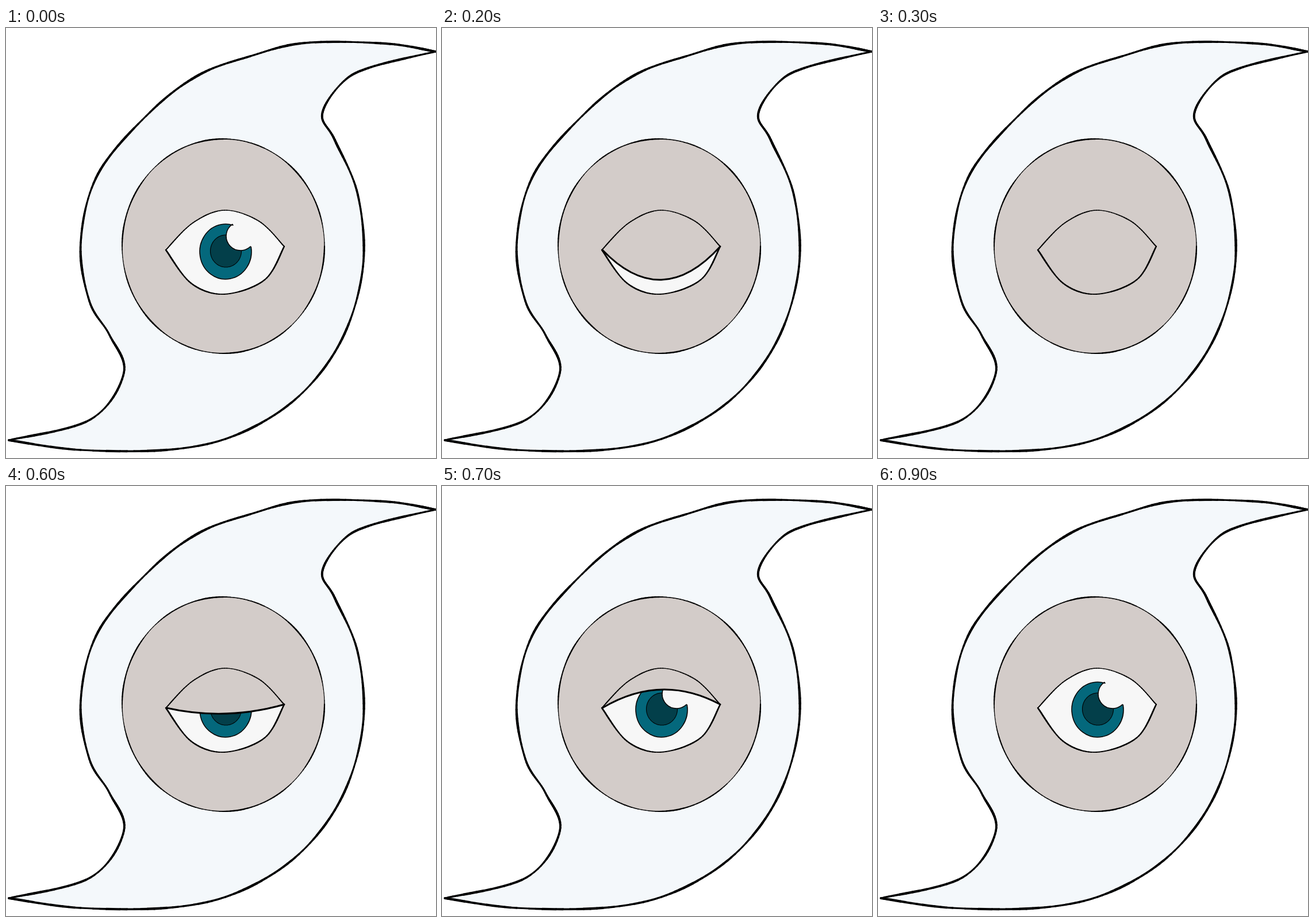
These frames come from a looping animation (748x748 px, 1000 ms). An HTML page with a canvas:

```html
<!DOCTYPE html>
<html lang="en">
<head>
<meta charset="utf-8">
<title>Blinking storm eye</title>
<style>
  html, body { margin: 0; width: 100%; height: 100%; overflow: hidden; background: #fff; }
  canvas { display: block; width: 748px; height: 748px; }
</style>
</head>
<body>
<canvas id="stage" width="748" height="748"></canvas>
<script>
const ctx = document.getElementById('stage').getContext('2d');
const STORM = '#f4f8fb', SKIN = '#d3ccc9', WHITE = '#f7f7f7';
const IRIS = '#04687c', PUPIL = '#033f4a';
const STEPS = 14;

// One coordinate of a Catmull-Rom segment from b to c.
function spline(a, b, c, d, t) {
  const bend = 2 * a - 5 * b + 4 * c - d;
  const twist = 3 * (b - c) + d - a;
  return b + 0.5 * t * (c - a + t * (bend + t * twist));
}

// Samples a smooth open curve through "x,y x,y ..." key points.
function curve(text) {
  const keys = text.trim().split(/\s+/).map(p => p.split(',').map(Number));
  const last = keys.length - 1;
  const key = i => keys[Math.max(0, Math.min(last, i))];
  const points = [];
  for (let i = 0; i < last; i++) {
    const [a, b, c, d] = [key(i - 1), key(i), key(i + 1), key(i + 2)];
    for (let s = 0; s < STEPS; s++) {
      const t = s / STEPS;
      points.push([spline(a[0], b[0], c[0], d[0], t), spline(a[1], b[1], c[1], d[1], t)]);
    }
  }
  points.push(keys[last]);
  return points;
}

function ellipse(x, y, rx, ry) {
  return Array.from({ length: 181 }, (_, i) => {
    const angle = i * Math.PI / 90;
    return [x + rx * Math.cos(angle), y + ry * Math.sin(angle)];
  });
}

function pathOf(points) {
  const path = new Path2D();
  points.forEach(([x, y]) => path.lineTo(x, y));
  path.closePath();
  return path;
}

const stormLeft = curve(`747,41 660,27 520,26 425,49 335,82 250,147 160,254
  130,373 145,475 180,534 205,600 147,681 5,717`);
const stormRight = curve(`5,717 130,734 290,733 405,706 510,640 585,540 621,415
  612,290 572,195 550,150 585,95 635,68 747,41`);
const ring = ellipse(378, 379.5, 176, 186.5);
const eyeTop = curve('278,386 325,339 380,317 440,336 484,380');
const eyeBottom = curve('484,380 450,438 380,463 322,444 278,386');

const stormShape = pathOf([...stormLeft, ...stormRight]);
const ringShape = pathOf(ring);
const eyeShape = pathOf([...eyeTop, ...eyeBottom]);
const pupil = pathOf(ellipse(382.5, 388, 27, 28));

// The iris is a disc with a round highlight bitten out.
const iris = new Path2D();
iris.ellipse(382, 389, 45, 48, 0, -0.17, 5.005);
iris.arc(408, 362, 25, -2.17, 0.81, true);
iris.closePath();

function fill(path, color) {
  ctx.fillStyle = color;
  ctx.fill(path);
}

function outline(path, width) {
  ctx.lineWidth = width;
  ctx.stroke(path);
}

function clipped(shape, paint) {
  ctx.save();
  ctx.clip(shape);
  paint();
  ctx.restore();
}

// Pen line whose pressure varies along its length.
function penLine(points, width, vary) {
  let length = 0;
  for (let i = 1; i < points.length; i++) {
    const [x0, y0] = points[i - 1];
    const [x1, y1] = points[i];
    length += Math.hypot(x1 - x0, y1 - y0);
    ctx.lineWidth = width + vary * (Math.sin(length / 13) + Math.sin(length / 31)) / 2;
    ctx.beginPath();
    ctx.moveTo(x0, y0);
    ctx.lineTo(x1, y1);
    ctx.stroke();
  }
}

function drawIris() {
  fill(iris, IRIS);
  clipped(iris, () => {
    fill(pupil, PUPIL);
    outline(pupil, 1.1);
  });
  outline(iris, 1.5);
}

// The lid edge hangs between the eye corners; sag is its depth at the middle.
function drawLid(sag) {
  const edge = new Path2D();
  edge.moveTo(279, 386);
  edge.quadraticCurveTo(381.5, 383 + 2 * sag, 484, 380);
  const lid = new Path2D(edge);
  lid.lineTo(484, 300);
  lid.lineTo(279, 300);
  lid.closePath();
  clipped(eyeShape, () => fill(lid, SKIN));
  outline(edge, 2.9);
}

const OPEN = 0, HIGH = 1, MIDDLE = 2, LOW = 3, CLOSED = 4;
const blink = [OPEN, MIDDLE, LOW, CLOSED, CLOSED, LOW, MIDDLE, HIGH, OPEN, OPEN];
const sagOf = pose => 42 * pose - 71;

function draw(time) {
  const pose = blink[Math.floor(time / 100) % blink.length];
  ctx.clearRect(0, 0, 748, 748);
  ctx.strokeStyle = '#000';
  ctx.lineCap = ctx.lineJoin = 'round';

  fill(stormShape, STORM);
  penLine(stormLeft, 3.7, 0.8);
  penLine(stormRight, 3.7, 0.8);
  fill(ringShape, SKIN);
  penLine(ring, 1.9, 0.8);

  fill(eyeShape, pose === CLOSED ? SKIN : WHITE);
  if (pose < LOW) drawIris();
  if (pose > OPEN && pose < CLOSED) drawLid(sagOf(pose));
  penLine(eyeTop, 1.7, 0.4);
  penLine(eyeBottom, 2.3, 0.5);
}

function tick(now) {
  draw(now);
  requestAnimationFrame(tick);
}
draw(0);
requestAnimationFrame(tick);
</script>
</body>
</html>
```
